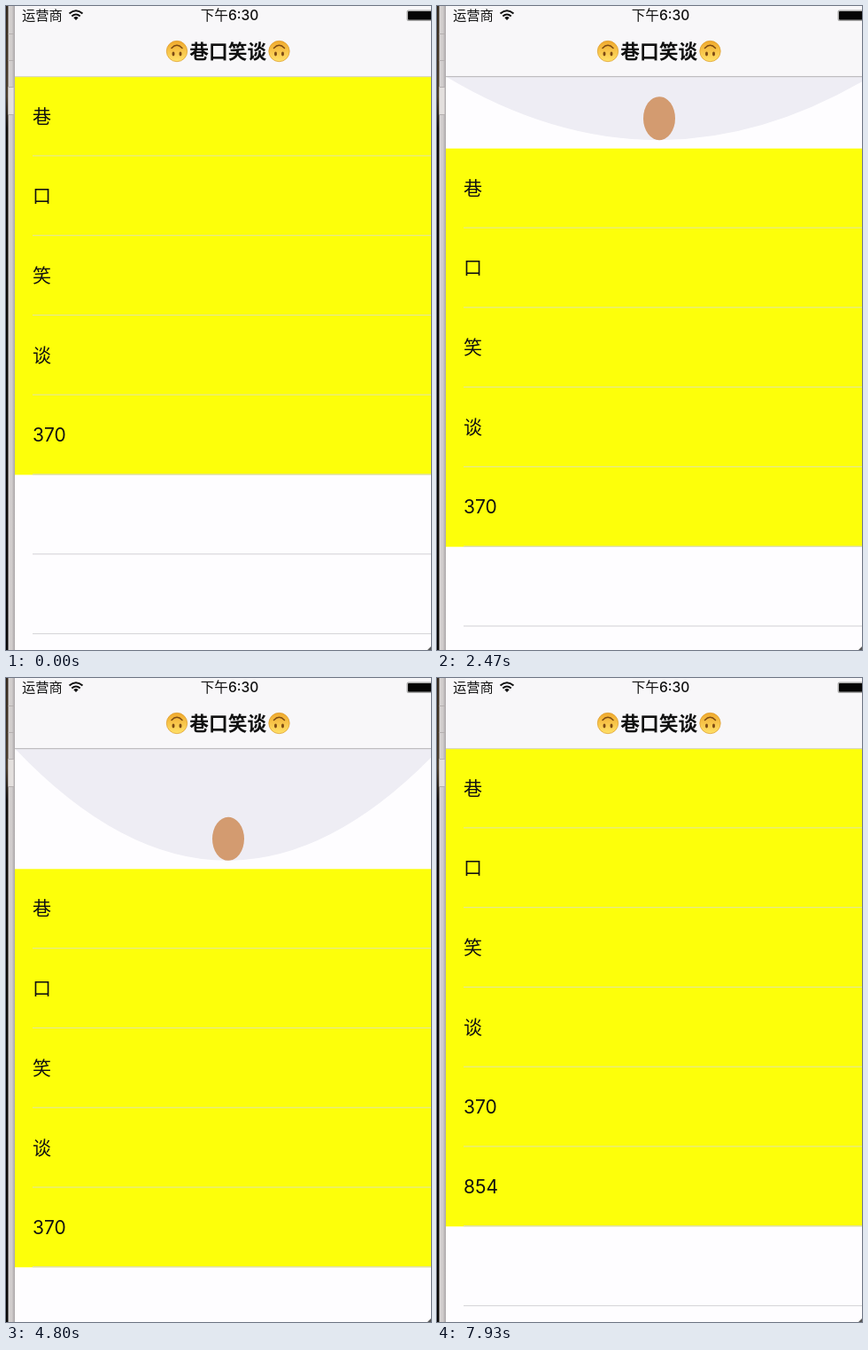
Animation of 480x726 px, one loop 8 s. Source, as an HTML page:

```html
<!DOCTYPE html>
<html lang="zh">
<head>
<meta charset="utf-8">
<style>
html, body { margin: 0; width: 100%; height: 100%; overflow: hidden; background: #fefdff; }
svg { display: block; width: 100%; height: 100%; }
text { font-family: Inter, "Noto Sans CJK SC", "Noto Sans CJK", sans-serif; fill: #111; }
</style>
</head>
<body>
<svg viewBox="0 0 480 726">
  <defs>
    <linearGradient id="edge">
      <stop offset="0" stop-color="#d9d5d4"/>
      <stop offset=".55" stop-color="#d0cccc"/>
      <stop offset="1" stop-color="#aaa6a8"/>
    </linearGradient>
    <linearGradient id="dark" x2="0" y2="1">
      <stop offset="0" stop-color="#33281d"/>
      <stop offset=".14" stop-color="#4a3c2a"/>
      <stop offset=".19" stop-color="#0d0a08"/>
      <stop offset="1" stop-color="#080706"/>
    </linearGradient>
    <linearGradient id="gold" x2="0" y2="1">
      <stop offset="0" stop-color="#f0a92c"/>
      <stop offset="1" stop-color="#ffe168"/>
    </linearGradient>
    <g id="face">
      <circle r="11.7" fill="url(#gold)" stroke="#dc9a2b" stroke-width=".7"/>
      <path d="M-6 -3.5Q0 -10 6 -3.5" fill="none" stroke="#7d4a14" stroke-width="1.5" stroke-linecap="round"/>
      <ellipse cx="-4" cy="3" rx="1.5" ry="2.4" fill="#7d4a14"/>
      <ellipse cx="4" cy="3" rx="1.5" ry="2.4" fill="#7d4a14"/>
    </g>
  </defs>

  <rect width="480" height="726" fill="#fefdff"/>
  <path id="bowl" fill="#eeedf4"/>
  <ellipse id="buddy" cx="251" rx="18" ry="24.5" fill="#d39b70"/>
  <g id="list"></g>

  <rect x="10" width="470" height="79.5" fill="#f8f7f9"/>
  <rect id="rule" x="10" y="79" width="470" height="1.2" fill="#bfbdc0"/>
  <text x="18" y="16" font-size="15.3">运营商</text>
  <g fill="none" stroke="#111" stroke-width="2">
    <path d="M71.5 8.5Q79 2 86.5 8.5M74.3 11.5Q79 7.5 83.7 11.5"/>
    <path d="M76.3 13.2Q79 11 81.7 13.2L79 16Z" fill="#111" stroke="none"/>
  </g>
  <text x="252.5" y="16" font-size="15.6" font-weight="500" text-anchor="middle">下午6:30</text>
  <rect x="452.5" y="4.5" width="40" height="12.5" rx="2" fill="#aaa"/>
  <rect x="454" y="6" width="40" height="9.5" rx="1" fill="#050505"/>
  <text x="250.7" y="59" font-size="21.7" font-weight="700" text-anchor="middle">巷口笑谈</text>
  <use href="#face" x="193" y="51"/>
  <use href="#face" x="308.5" y="51"/>

  <rect width="3" height="726" fill="url(#dark)"/>
  <rect x="2.5" width="7.5" height="726" fill="url(#edge)"/>
  <rect x="2.5" y="91" width="6" height="31" fill="#e4e0de"/>
  <path d="M2.5 31.5h7M2.5 61.5h7M2.5 91.5h7M2.5 122.5h7" stroke="#b5b0b0"/>
  <path d="M480 722v4h-4z" fill="#555"/>
</svg>
<script>
const LOOP = 8000, TOP = 79.5, ROW = 89.8;
const RELEASE = 4600, RELOAD = 7230, REST = 64;
const labels = ['巷', '口', '笑', '谈', '370', '854'];
const $ = id => document.getElementById(id);

// Finger drag: [ms, px]
const drag = [[0, 0], [870, 6], [1770, 19], [2000, 27], [2470, 81],
  [2600, 103], [3130, 129], [4400, 157], [RELEASE, 157]];

const slope = i => (drag[i + 1][1] - drag[i][1]) / (drag[i + 1][0] - drag[i][0]);

function tangent(i) {
  if (i === 0 || i === drag.length - 1) return 0;
  const a = slope(i - 1), b = slope(i);
  return a * b > 0 ? 2 * a * b / (a + b) : 0;
}

function dragAt(t) {
  let i = 0;
  while (i < drag.length - 2 && t >= drag[i + 1][0]) i++;
  const [t0, y0] = drag[i], [t1, y1] = drag[i + 1];
  const h = t1 - t0, u = (t - t0) / h, v = 1 - u;
  return v * v * (1 + 2 * u) * y0 + u * u * (3 - 2 * u) * y1
    + h * u * v * (v * tangent(i) - u * tangent(i + 1));
}

function ease(t, start, length) {
  const u = Math.min(1, Math.max(0, (t - start) / length));
  return u * u * (3 - 2 * u);
}

function pull(t) {
  if (t < RELEASE) return dragAt(t);
  if (t < RELOAD) return 157 + (REST - 157) * ease(t, RELEASE, 650);
  return REST * (1 - ease(t, RELOAD, 400));
}

function listMarkup(count) {
  let s = `<rect x="10" width="470" height="${count * ROW}" fill="#fdff0a"/>`;
  for (let i = 0; i < 8; i++) {
    const y = i * ROW;
    const color = i < count - 1 ? '#e3e699' : '#d6d5d9';
    s += `<rect x="30" y="${y + ROW - 1}" width="450" height="1.1" fill="${color}"/>`;
    if (i < count) s += `<text x="30" y="${y + 52}" font-size="21">${labels[i]}</text>`;
  }
  return s;
}

let shown = 0;
function draw(t) {
  const d = pull(t), depth = Math.max(0, d - 9.5);
  const count = t < RELOAD ? 5 : 6;
  if (count !== shown) $('list').innerHTML = listMarkup(shown = count);
  $('list').setAttribute('transform', `translate(0 ${TOP + d})`);
  $('bowl').setAttribute('d', `M10 ${TOP}Q250 ${TOP + 2 * depth} 490 ${TOP}Z`);
  $('buddy').setAttribute('cy', d + 45.5);
  $('rule').setAttribute('fill', d < 1 ? '#d9d8c0' : '#bfbdc0');
}

const begin = performance.now();
function tick() {
  draw((performance.now() - begin) % LOOP);
  requestAnimationFrame(tick);
}
tick();
</script>
</body>
</html>
```
